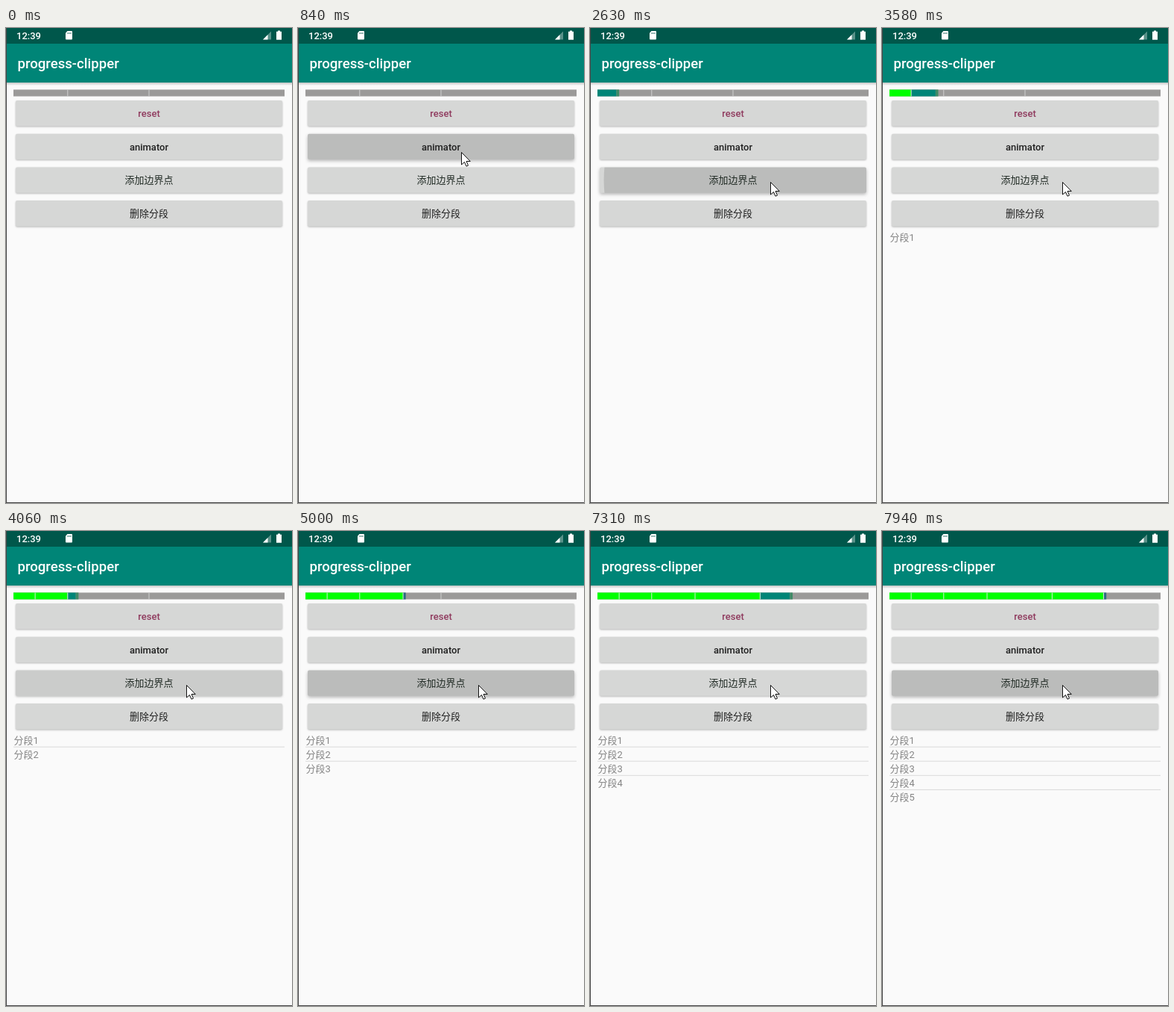
An HTML page that plays this animation: 384x636 px, repeating every 8 s.

```html
<!DOCTYPE html>
<html lang="zh">
<head>
<meta charset="utf-8">
<title>progress-clipper</title>
<style>
html, body { margin: 0; width: 100%; height: 100%; overflow: hidden; background: #fafafa; }
svg { display: block; width: 384px; height: 636px; }
text { font-family: Roboto, "Noto Sans CJK SC", "Noto Sans CJK", sans-serif; font-size: 13px; }
.med { font-weight: 500; }
</style>
</head>
<body>
<svg id="stage" viewBox="0 0 384 636">
  <defs>
    <linearGradient id="shade" x2="0" y2="1">
      <stop offset="0" stop-opacity=".22"/>
      <stop offset="1" stop-opacity="0"/>
    </linearGradient>
  </defs>
  <rect width="384" height="636" fill="#fafafa"/>
  <rect y="73" width="384" height="4" fill="url(#shade)"/>
  <rect width="384" height="21" fill="#00574b"/>
  <rect y="21" width="384" height="52" fill="#008577"/>
  <g fill="#fff">
    <text class="med" x="14" y="15">12:39</text>
    <path d="M82.5 4H88a1 1 0 0 1 1 1V14.5a1 1 0 0 1-1 1H81a1 1 0 0 1-1-1V6.7Z"/>
    <path d="M83 6v2m2-2v2m2-2v2" stroke="#00574b" stroke-width=".8"/>
    <path d="M356 4.5V15.5H345Z" opacity=".35"/>
    <path d="M351.5 9V15.5H345Z"/>
    <path d="M365 3.5h3v1.2h2v11h-7v-11h2Z"/>
    <text class="med" x="15.5" y="54" style="font-size:18.6px">progress-clipper</text>
  </g>
  <g id="bar"></g>
  <g id="buttons"></g>
  <g id="list"></g>
  <path d="M.5 0V636M0 635.5H384" stroke="#444"/>
  <circle id="halo" r="12" fill="#ff0" opacity=".55"/>
  <path id="cursor" d="M0 0V16.5L4 13L6.5 18.7L9 17.6L6.6 12H11.8Z" stroke="#111" stroke-width="1"/>
</svg>
<script>
const LOOP = 8000, X0 = 10, WIDTH = 364;
const $ = id => document.getElementById(id);

function add(parent, tag, attrs, text) {
  const el = document.createElementNS("http://www.w3.org/2000/svg", tag);
  set(el, attrs);
  if (text) el.textContent = text;
  parent.appendChild(el);
  return el;
}
function set(el, attrs) {
  for (const k in attrs) el.setAttribute(k, attrs[k]);
}
const clamp = v => Math.max(0, Math.min(1, v));
const show = (el, on) => el.setAttribute("visibility", on ? "visible" : "hidden");
const pctX = p => X0 + WIDTH * p / 100;

// Screen refresh moments: [first, last, count]
const ticks = [0];
for (const [a, b, n] of [[70, 530, 7], [680, 1150, 7], [1460, 1920, 3], [2070, 2230, 2],
  [2390, 3110, 10], [3260, 4060, 11], [4140, 4930, 11], [5000, 5790, 11],
  [5870, 6670, 11], [6750, 7550, 11], [7630, 7940, 5]])
  for (let i = 0; i < n; i++) ticks.push(Math.round((a + (b - a) * i / (n - 1)) / 10) * 10);

// Touches: press time, button index, point
const presses = [
  { at: 684, btn: 1, x: 219, y: 167 },
  ...[2507, 3745, 4843, 6383, 7730].map(at => ({ at, btn: 2, x: 242, y: 207 }))
];
// Cut points: time and percent
const cuts = [[2700, 8], [3810, 20], [4960, 36], [6520, 60], [7890, 79]];
const marks = [20, 50];

// Fast-out slow-in curve, cubic-bezier(.4, 0, .2, 1)
function ease(u) {
  let lo = 0, hi = 1;
  for (let i = 0; i < 18; i++) {
    const s = (lo + hi) / 2, r = 1 - s;
    if (1.2 * r * r * s + .6 * r * s * s + s * s * s < u) lo = s; else hi = s;
  }
  return lo * lo * (3 - 2 * lo);
}

const bar = $("bar");
const strip = fill => add(bar, "rect", { x: X0, y: 82.5, width: 0, height: 9, fill });
const track = strip("#9b9a99");
track.setAttribute("width", WIDTH);
const markEls = marks.map(p => add(bar, "rect", { x: pctX(p) - .5, y: 82.5, width: 1, height: 9, fill: "#d0d0d0" }));
const done = strip("#00ff00"), run = strip("#008577"), head = strip("#3f8a66");
const cutEls = cuts.map(([, p]) => add(bar, "rect", { x: pctX(p) - .5, y: 82.5, width: 1, height: 9, fill: "#d4f0d4" }));

const buttons = [["reset", "#8f3a5e"], ["animator", "#202020"], ["添加边界点", "#202a24"], ["删除分段", "#202020"]]
  .map(([label, color], i) => {
    const y = 97 + i * 44.7, box = { x: 13, y, width: 358, height: 34.3, rx: 2 };
    const clip = add(add($("stage"), "clipPath", { id: "clip" + i }), "rect", box);
    const face = add($("buttons"), "rect", { ...box, fill: "#d6d7d6" });
    const g = add($("buttons"), "g", { "clip-path": `url(#${clip.parentNode.id})` });
    const wave = add(g, "circle", { r: 0 });
    add($("buttons"), "text", { x: 192, y: y + 22, fill: color, class: i < 2 ? "med" : "", "text-anchor": "middle" }, label);
    return { face, wave };
  });

const rows = cuts.map((_, i) => {
  const g = add($("list"), "g", {}), y = 284.7 + i * 19.1;
  if (i) add(g, "rect", { x: X0, y: y - 15.2, width: WIDTH, height: 1, fill: "#dadada" });
  add(g, "text", { x: 10.5, y, fill: "#858585" }, "分段" + (i + 1));
  return g;
});

function drawBar(t) {
  const u = clamp((t - 740) / 10150);
  const n = Math.floor(50 * (1 - Math.cos(Math.PI * u)));
  let last = 0;
  cuts.forEach(([at, p], i) => {
    const on = t >= at;
    if (on) last = p;
    show(cutEls[i], on);
    show(rows[i], on);
  });
  const end = Math.max(last, n - 1);
  set(done, { width: pctX(last) - X0 });
  set(run, { x: pctX(last), width: pctX(end) - pctX(last) });
  set(head, { x: pctX(end), width: n > end ? WIDTH / 100 : 0, fill: last && end === last ? "#2a6c80" : "#3f8a66" });
  markEls.forEach((el, i) => show(el, marks[i] > n));
}

function drawButtons(t) {
  buttons.forEach(({ face, wave }, i) => {
    const p = presses.filter(q => q.btn === i && t >= q.at).pop();
    const age = p ? t - p.at : 1e4;
    const alpha = clamp(age / 55) * clamp(1 - (age - 225) / 150);
    if (alpha > 0) {
      const g = ease(clamp(age / 190));
      set(wave, { cx: p.x + (192 - p.x) * g, cy: p.y + (face.y.baseVal.value + 17 - p.y) * g, r: 107 + 78 * g });
    }
    wave.setAttribute("opacity", .125 * alpha);
    face.style.filter = `drop-shadow(0 ${1 + alpha}px ${1 + alpha}px rgba(0,0,0,.27))`;
  });
}

function pointer(t) {
  if (t < 450) {
    const u = clamp((t - 70) / 380), e = u * (2 - u);
    return [298 - 87 * e, 611 - 448 * e];
  }
  if (t < 1000) {
    const u = clamp((t - 450) / 80);
    return [211 + 8.5 * u, 163 + 3.5 * u];
  }
  const e = ease(clamp((t - 1000) / 150));
  return [219.5 + 23 * e, 166.5 + 40 * e];
}

function draw(t) {
  drawBar(t);
  drawButtons(t);
  const [x, y] = pointer(t);
  const down = presses.some(p => t >= p.at - 30 && t < p.at + 90);
  set($("cursor"), { transform: `translate(${x} ${y})`, fill: down ? "#ffff88" : "#fff" });
  show($("cursor"), t >= 70);
  set($("halo"), { cx: x - .5, cy: y - .5 });
  show($("halo"), down);
}

function tick() {
  const t = performance.now() % LOOP;
  draw(ticks.filter(v => v <= t).pop());
  requestAnimationFrame(tick);
}
tick();
</script>
</body>
</html>
```
